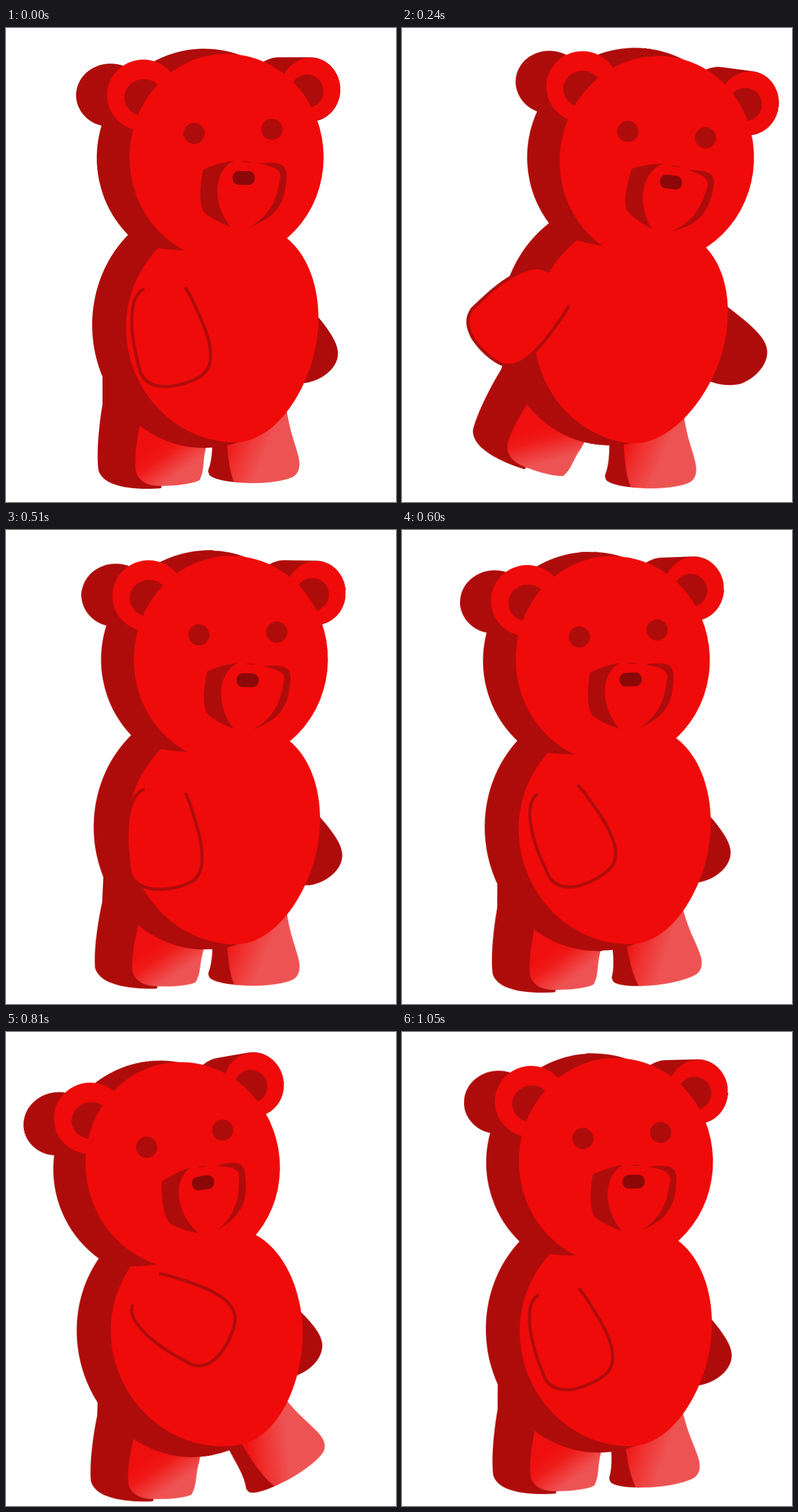
An HTML page for the animation above (1.08 s loop, 679 by 825 pixels).

```html
<!DOCTYPE html>
<html lang="en">
<head>
<meta charset="utf-8">
<title>Walking gummy bear</title>
<style>
  html, body { margin: 0; width: 100%; height: 100%; overflow: hidden; background: #fff; }
  svg { display: block; width: 679px; height: 825px; fill: #ef0b0a; }

  /* Every part swings from rest to --a, back, to --b and back. */
  .part {
    transform-origin: var(--pivot);
    animation: swing 1080ms -4ms infinite;
  }
  @keyframes swing {
    0%, 50% { transform: rotate(0deg); animation-timing-function: steps(9); }
    25% { transform: rotate(var(--a)); animation-timing-function: steps(9); }
    75% { transform: rotate(var(--b)); animation-timing-function: steps(8); }
    97.2222% { transform: rotate(calc(var(--b) * .15)); animation-timing-function: steps(1); }
    100% { transform: rotate(0deg); }
  }
  .bear      { --pivot: 387px 676px; --a: 8.55deg; --b: -9.75deg; }
  .far-arm   { --pivot: 478px 432px; --a: -22deg;  --b: 3deg; }
  .near-arm  { --pivot: 242px 428px; --a: 59.5deg; --b: -37.5deg; }
  .left-leg  { --pivot: 293px 620px; --a: 15.6deg; --b: 11.7deg; }
  .right-leg { --pivot: 457px 655px; --a: -8.1deg; --b: -20deg; }

  .dark { fill: #ae0c0b; }
  .nose { fill: #8c0707; }
  .line { stroke: #ae0c0b; stroke-width: 5.5; }
</style>
</head>
<body>
<svg viewBox="0 0 679 825">
  <defs>
    <linearGradient id="shineLeft" gradientUnits="userSpaceOnUse" x1="252" y1="733" x2="290" y2="784">
      <stop offset="0" stop-color="#ef0f0e"/>
      <stop offset=".35" stop-color="#ef1a19"/>
      <stop offset="1" stop-color="#ee5353"/>
    </linearGradient>
    <linearGradient id="shineRight" gradientUnits="userSpaceOnUse" x1="385" y1="716" x2="450" y2="744">
      <stop offset="0" stop-color="#ef1211"/>
      <stop offset=".35" stop-color="#ef2c2b"/>
      <stop offset="1" stop-color="#ee5353"/>
    </linearGradient>
  </defs>

  <g class="part bear">
    <g class="part far-arm">
      <path class="dark" d="M470 450L520 475C545 505 578 540 578 566C578 595 545 615 520 618Q490 618 465 600Z"/>
    </g>

    <g class="part right-leg">
      <path class="dark" d="M420 660L360 680L359 731Q358 755 352 770Q352 779 360 782Q378 790 410 791Z"/>
      <path fill="url(#shineRight)" d="M440 640L384 690Q384 760 397 790C430 795 480 791 500 781Q514 772 510 750Q508 740 500 715Q492 690 487 655Z"/>
    </g>

    <g class="part left-leg">
      <path class="dark" d="M240 600H168V655C162 690 157 740 161 770Q166 785 185 793C210 803 245 803 270 801L300 700Z"/>
      <path fill="url(#shineLeft)" d="M300 640L238 660L232 696C226 730 223 755 227 775Q236 797 268 797C300 797 325 793 337 787C346 770 342 755 348 731L352 700Z"/>
    </g>

    <!-- shaded back -->
    <g class="dark">
      <ellipse cx="345" cy="517" rx="195" ry="214"/>
      <ellipse cx="345" cy="226" rx="187" ry="190"/>
      <ellipse cx="182" cy="117" rx="60" ry="55"/>
      <rect x="423" y="51" width="159" height="112" rx="52" ry="56"/>
    </g>

    <!-- belly -->
    <path d="M209 522C209 625 290 721 400 721C475 721 544 610 544 505C544 440 520 390 489 366L310 387Q287 387 265 383C225 425 209 475 209 522Z"/>

    <!-- ears, then the head over their inner edges -->
    <ellipse cx="239" cy="117" rx="63" ry="62"/>
    <ellipse class="dark" cx="240" cy="121" rx="34" ry="32"/>
    <ellipse cx="530" cy="107" rx="52" ry="55"/>
    <circle class="dark" cx="524" cy="110" r="29"/>
    <ellipse cx="384" cy="225" rx="169" ry="180"/>

    <!-- face -->
    <g class="dark">
      <circle cx="327.5" cy="183.5" r="18.5"/>
      <circle cx="463" cy="176.5" r="18.5"/>
      <path d="M343 247Q368 235 397 231C361 248 358 305 391 346Q358 334 344 320Q333 300 343 247Z"/>
      <path d="M409 233Q418 230 428 234Z"/>
      <path d="M440 236Q470 232 482 239Q490 246 488 262C486 300 475 328 425 346C468 322 473 285 478 258Q478 242 440 236Z"/>
    </g>
    <rect class="nose" x="394.5" y="249" width="38.5" height="24" rx="11"/>

    <g class="part near-arm">
      <path class="line" d="M241 454Q219 463 219 510C219 545 228 575 234 600Q246 626 283 624C315 621 340 607 346 600Q360 585 355 555C350 525 335 497 322 468L312 451"/>
    </g>
  </g>
</svg>
</body>
</html>
```
